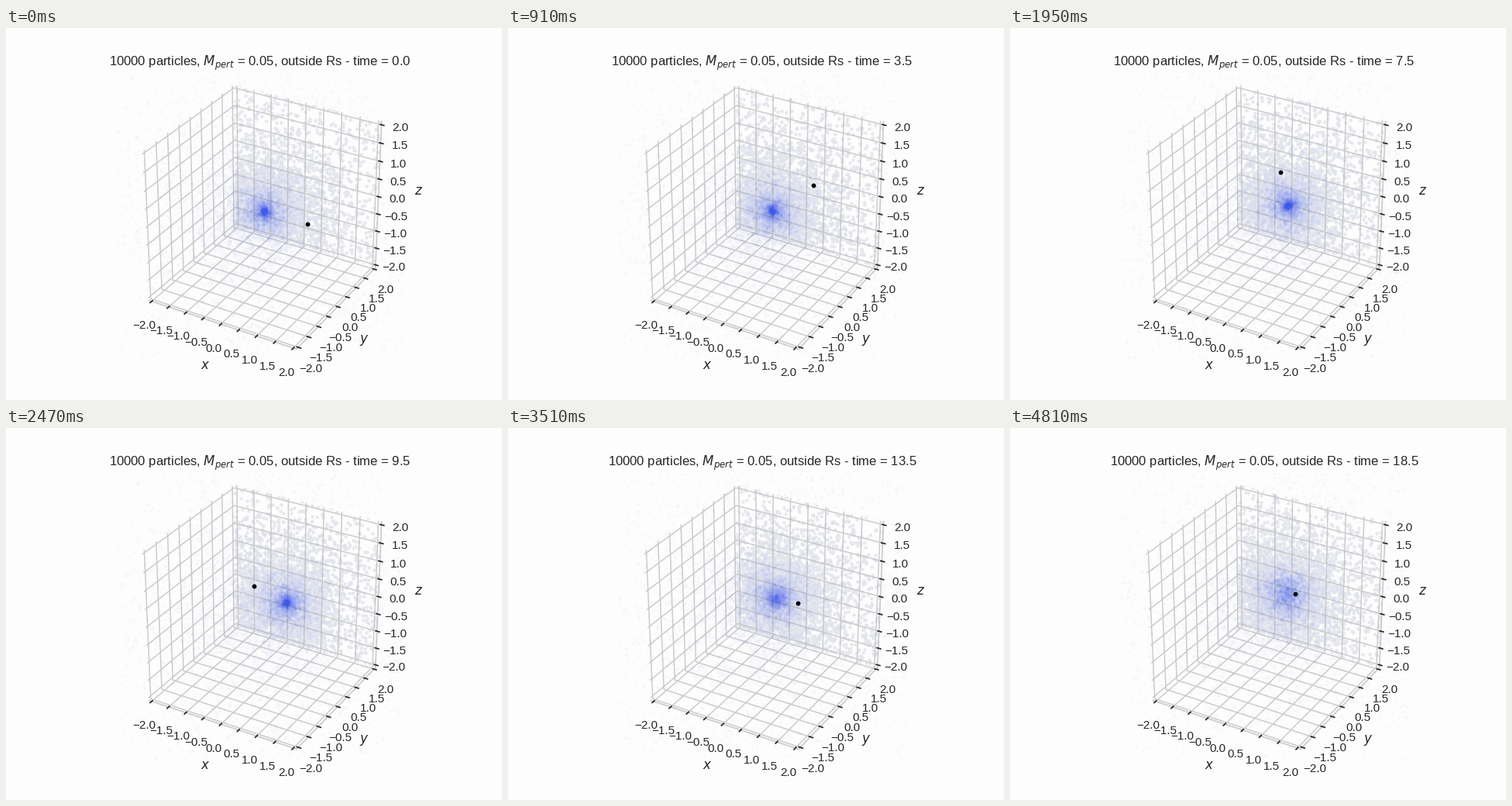
Write a matplotlib script that moves like this. It is 640 px wide and 480 px high and loops after 4.94 s.

```python
import numpy as np
import matplotlib.pyplot as plt
from matplotlib.animation import FuncAnimation
from matplotlib.lines import Line2D
from matplotlib.patches import Polygon
from mpl_toolkits.mplot3d import proj3d

FRAMES, INTERVAL = 38, 130
N, SCALE = 10000, 1.0
MARGIN = 1 / 48                  # gap between the end ticks and the panes
PX = 52.76                       # screen pixels per data unit at the centre
CENTRE = np.array([333.0, 237.4])
INK, LINE, PAPER = "0.15", "0.8", "#fdfdfd"

plt.rcParams.update({
    "font.family": "Liberation Sans", "font.size": 12,
    "axes.titlesize": 12, "axes.labelsize": 12,
    "xtick.labelsize": 11, "ytick.labelsize": 11,
    "text.color": INK, "axes.labelcolor": INK,
    "xtick.color": INK, "ytick.color": INK,
    "axes.edgecolor": LINE, "axes.linewidth": 1.25,
    "grid.color": LINE, "grid.linewidth": 1.1,
    "xtick.major.width": 1.25, "ytick.major.width": 1.25,
})

# View basis for elev 30, azim -60
RIGHT = np.array([np.sqrt(3) / 2, 0.5, 0.0])
UP = np.array([-0.25, np.sqrt(3) / 4, np.sqrt(3) / 2])


def smooth(keys, values, at):
    """Cubic Hermite curve through a few keys."""
    keys, values = np.asarray(keys, float), np.asarray(values, float)
    slope = np.gradient(values, keys)
    i = np.clip(np.searchsorted(keys, at, side="right") - 1, 0, len(keys) - 2)
    h = keys[i + 1] - keys[i]
    s = (at - keys[i]) / h
    return ((1 + 2 * s) * (1 - s) ** 2 * values[i]
            + s * (1 - s) ** 2 * h * slope[i]
            + s * s * (3 - 2 * s) * values[i + 1]
            + s * s * (s - 1) * h * slope[i + 1])


def to_data(x, y):
    """Screen offset in pixels (y down) to a point in the view plane."""
    return np.outer(x, RIGHT) / PX - np.outer(y, UP) / PX


# Core drift and the perturber spiralling into it
steps = np.arange(FRAMES)
keys = [0, 7, 11, 19, 27, 33, 37]
core_x = smooth(keys, [333, 341, 351, 362, 346, 368, 357], steps)
core_y = smooth(keys, [237, 236, 232, 225, 219, 211, 214], steps)
angle = np.radians(smooth(keys, [-16, 32, 69, 153, 346, 579, 720], steps))
dist = smooth(keys, [58, 62, 44, 47, 29, 6, 11], steps)
core = to_data(core_x - CENTRE[0], core_y - CENTRE[1])
pert = to_data(core_x + dist * np.cos(angle) - CENTRE[0],
               core_y - dist * np.sin(angle) - CENTRE[1])

# Cuspy halo, every particle on its own circular orbit
rng = np.random.default_rng(7)
radius = SCALE / (rng.uniform(1e-4, 0.9, N) ** (-2 / 3) - 1)
e1 = rng.normal(size=(N, 3))
e1 /= np.linalg.norm(e1, axis=1, keepdims=True)
e2 = np.cross(e1, rng.normal(size=(N, 3)))
e2 /= np.linalg.norm(e2, axis=1, keepdims=True)
omega = 0.25 / (np.sqrt(radius + 0.02) * (radius + 0.5))
kick = rng.normal(size=(N, 3))
follow = 1 / (1 + (radius / 1.5) ** 2)


def halo(k):
    phase = (omega * k)[:, None]
    pos = radius[:, None] * (np.cos(phase) * e1 + np.sin(phase) * e2)
    heat = 0.2 * (k / (FRAMES - 1)) ** 2
    return pos + heat * kick + follow[:, None] * core[k]


fig = plt.figure(figsize=(6.4, 4.8), dpi=100, facecolor=PAPER)
ax = fig.add_subplot(projection="3d")
ax.set_box_aspect((1, 1, 1))
ax.patch.set_visible(False)
for set_lim in (ax.set_xlim, ax.set_ylim, ax.set_zlim):
    set_lim(-2, 2, view_margin=MARGIN)
ticks = np.linspace(-2, 2, 9)
for axis, name in zip((ax.xaxis, ax.yaxis, ax.zaxis), "xyz"):
    axis.set_ticks(ticks)
    axis.set_label_text(f"${name}$")
    axis.set_pane_color((1, 1, 1, 0))
ax.yaxis.pane.set_edgecolor("#ececf0")


def project(p):
    x, y, _ = proj3d.proj_transform(p[:, 0], p[:, 1], p[:, 2], ax.get_proj())
    return np.asarray(x), np.asarray(y)


# Pale dots that show only against the back wall, beneath the grid
edge = 2 + 4 * MARGIN
wall = np.array([(-edge, edge, -edge), (edge, edge, -edge),
                 (edge, edge, edge), (-edge, edge, edge)])
wall_patch = Polygon(np.column_stack(project(wall)), transform=ax.transData)
haze = Line2D([], [], ls="", marker="o", ms=3.2, mew=0, color="#eaebee",
              transform=ax.transData, zorder=-1)
fig.add_artist(haze)
haze.set_clip_path(wall_patch)

dots, = ax.plot([], [], [], "o", ms=2.9, mew=0, color="#3a5cf0", alpha=0.018)
body, = ax.plot([], [], [], "o", ms=4.2, mew=0, color="black", zorder=5)
title = ax.set_title("")


def draw(k):
    pos = halo(k)
    haze.set_data(*project(pos))
    dots.set_data_3d(*pos.T)
    body.set_data_3d(*pert[k][:, None])
    title.set_text("10000 particles, $M_{pert}$ = 0.05, "
                   f"outside Rs - time = {k * 0.5:.1f}")
    return haze, dots, body, title


anim = FuncAnimation(fig, draw, frames=FRAMES, interval=INTERVAL,
                     init_func=lambda: draw(0), repeat=True)
plt.show()
```
